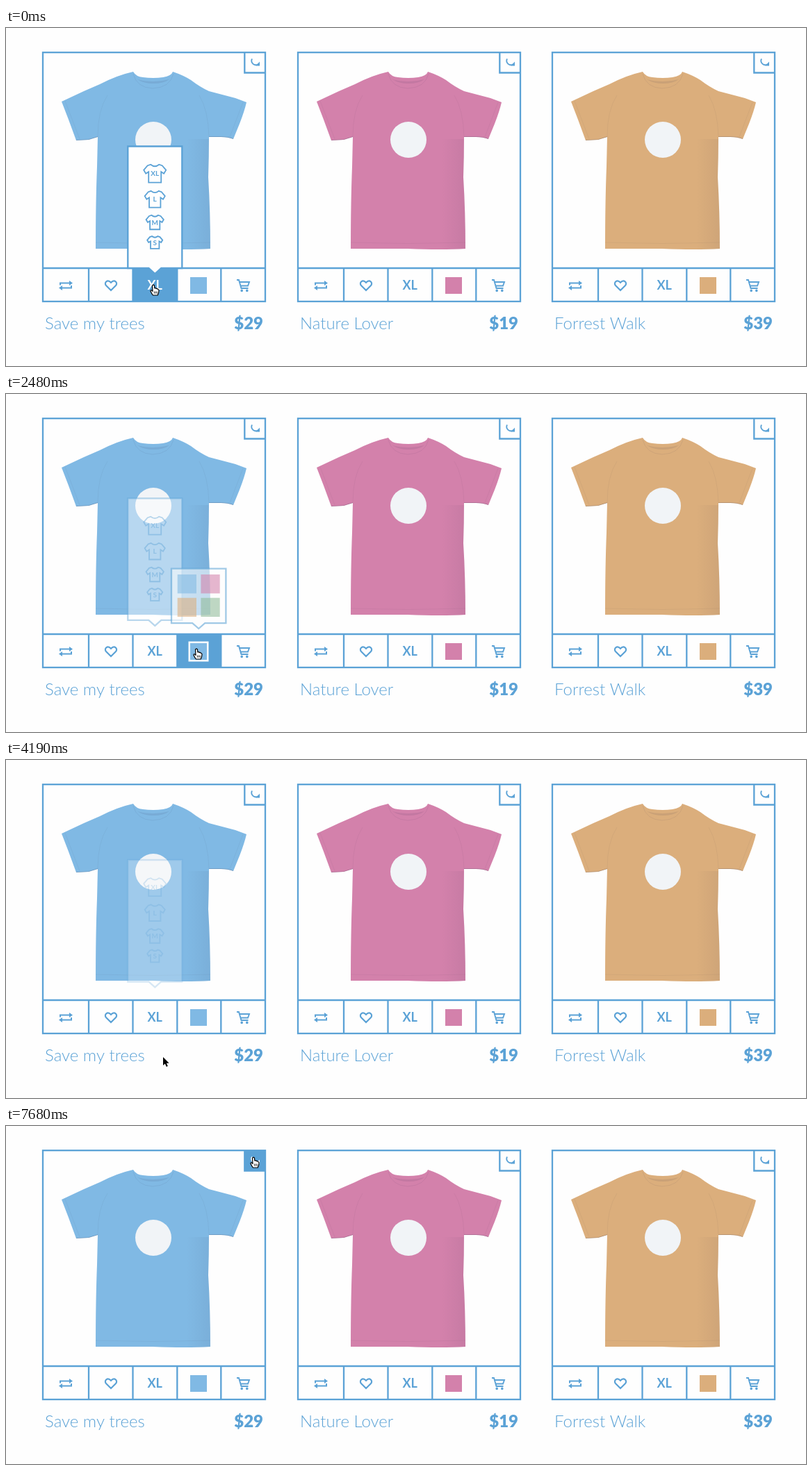
An HTML page with a canvas that plays this animation: 1151x487 px, repeating every 8 s.

```html
<!DOCTYPE html>
<html lang="en">
<head>
<meta charset="utf-8">
<title>Shirt shop</title>
<style>
  html, body { margin: 0; width: 100%; height: 100%; overflow: hidden; background: #fefefe; }
  canvas { display: block; width: 1151px; height: 487px; }
</style>
</head>
<body>
<canvas id="stage"></canvas>
<script>
const W = 1151, H = 487, LOOP = 8000;
const LINE = '#5ba2d6', PAPER = '#fefefe', PRINT = '#f1f4f7';
const BLUE = '#80b9e4', PINK = '#d381ab', TAN = '#dbae7c', GREEN = '#8fbb98';
const FONT = 'Lato, sans-serif';

const canvas = document.getElementById('stage');
const ctx = canvas.getContext('2d');
const ratio = window.devicePixelRatio || 1;
canvas.width = Math.round(W * ratio);
canvas.height = Math.round(H * ratio);

const cards = [
  { x: 0, title: 'Save my trees', price: '$29', color: BLUE },
  { x: 367, title: 'Nature Lover', price: '$19', color: PINK },
  { x: 733, title: 'Forrest Walk', price: '$39', color: TAN }
];
const edges = [53, 119, 182.5, 246.3, 309.3, 373];
const centers = [86, 151, 214.2, 277, 341];
const barTop = 346, barBottom = 394, barMid = 371;

// Periods of movement: start, end, number of picture updates
const bursts = [
  [420, 420, 1], [570, 920, 4], [1270, 1450, 4], [1600, 1830, 3], [2130, 2600, 6],
  [3050, 3270, 5], [3420, 3650, 3], [3860, 4040, 4], [4190, 4310, 2],
  [4480, 5050, 11], [5470, 5860, 7], [6100, 6670, 11], [7080, 7680, 11]
];

// Pointer tip: time, x, y
const pointerPath = [
  [0, 212, 370], [419, 212, 370], [420, 214, 370], [680, 274, 366], [1200, 274, 366],
  [1450, 236, 368], [1600, 230, 369], [1710, 227, 369], [1830, 226, 369], [2080, 226, 369],
  [2412, 274, 367], [2600, 277, 368], [3000, 277, 368], [3270, 236, 369], [3420, 230, 369],
  [3650, 225, 369], [3810, 225, 369], [4040, 226, 426], [4190, 226, 428], [4430, 226, 428],
  [5050, 85, 372], [5400, 85, 372], [5470, 86, 373], [5860, 150, 368], [6050, 150, 368],
  [6670, 233, 159], [7030, 233, 159], [7680, 356, 45], [8000, 356, 45]
];

// Menu changes: time, duration, open state reached
const sizeMenu = [[-500, 1, 1], [560, 300, 0], [1425, 350, 1], [2220, 350, 0], [3230, 380, 1], [3925, 390, 0]];
const colorMenu = [[-500, 1, 0], [560, 300, 1], [1415, 340, 0], [2220, 350, 1], [3240, 380, 0]];

const clamp = v => Math.max(0, Math.min(1, v));
const smooth = v => { v = clamp(v); return v * v * (3 - 2 * v); };

function snapTime(t) {
  let shown = 0;
  for (const [start, end, steps] of bursts) {
    if (t < start) break;
    const gap = (end - start) / (steps - 1) || 1;
    const step = Math.min(steps - 1, Math.floor((t - start) / gap + 0.1));
    shown = start + step * gap;
  }
  return shown;
}

function pointerAt(t) {
  let i = 0;
  while (i < pointerPath.length - 2 && pointerPath[i + 1][0] <= t) i++;
  const [t0, x0, y0] = pointerPath[i], [t1, x1, y1] = pointerPath[i + 1];
  const k = smooth((t - t0) / (t1 - t0));
  return { x: x0 + (x1 - x0) * k, y: y0 + (y1 - y0) * k };
}

function openness(changes, t) {
  let value = 0;
  for (const [start, length, goal] of changes) {
    if (t >= start) value += (goal - value) * smooth((t - start) / length);
  }
  return value;
}

function hoveredCell({ x, y }) {
  if (x > 343 && x < 373 && y > 35 && y < 65) return 'corner';
  if (y < barTop || y > barBottom) return -1;
  for (let i = 0; i < 5; i++) if (x >= edges[i] && x < edges[i + 1]) return i;
  return -1;
}

function at(x, y, scale, draw) {
  ctx.save();
  ctx.translate(x, y);
  ctx.scale(scale, scale);
  draw();
  ctx.restore();
}

function stroke(path, color, width) {
  ctx.strokeStyle = color;
  ctx.lineWidth = width;
  ctx.stroke(path);
}

function text(string, x, y, font, color, align = 'left') {
  ctx.font = `${font} ${FONT}`;
  ctx.fillStyle = color;
  ctx.textAlign = align;
  ctx.fillText(string, x, y);
}

function box(x, y, w, h, color) {
  ctx.fillStyle = color;
  ctx.fillRect(x, y, w, h);
}

const shirt = new Path2D(`M183 63 Q187 70 197 71 Q212 73 226 71 Q238 69 240 63 Q255 68 266 75
  Q279 85 292 91 L330 101 L346 107 Q343 120 336 138 L327 160 Q319 157 309 157 L292 157
  Q292 185 291 215 Q294 265 294 318 Q260 320 211 318 L129 318 Q129 250 131 200
  L132 157 L119 161 L101 162 L90 132 L80 106 L112 91 L135 81 Q160 68 183 63 Z`);
const collar = new Path2D('M183 66 Q188 86 211 87 Q236 86 241 66');
const innerCollar = new Path2D('M189 74 Q198 80 212 80 Q227 80 235 74 Q223 77 212 77 Q199 77 189 74 Z');
const seams = new Path2D('M129 309 Q211 312 294 309 M132 157 Q132 118 146 97 M292 157 Q291 118 278 97 M85 105 L106 160 M341 107 L322 157');
const cuffs = new Path2D('M101 162 L119 161 L132 157 M292 157 L309 157 Q319 157 327 160');

function drawShirt(color) {
  ctx.fillStyle = color;
  ctx.fill(shirt);
  ctx.save();
  ctx.clip(shirt);
  const shade = ctx.createLinearGradient(260, 0, 295, 0);
  shade.addColorStop(0, 'rgba(40,40,70,0)');
  shade.addColorStop(1, 'rgba(40,40,70,.07)');
  box(250, 160, 46, 160, shade);
  stroke(collar, 'rgba(40,40,70,.07)', 1);
  ctx.fillStyle = 'rgba(40,40,70,.09)';
  ctx.fill(innerCollar);
  stroke(seams, 'rgba(40,40,70,.05)', 1);
  stroke(cuffs, 'rgba(40,40,70,.25)', 1.6);
  ctx.restore();
  ctx.fillStyle = PRINT;
  ctx.beginPath();
  ctx.arc(212, 161, 26, 0, Math.PI * 2);
  ctx.fill();
}

const swapLines = new Path2D('M-8 -0.5 V-3.5 H6 M8 0 V3.5 H-6');
const swapHeads = new Path2D('M5 -7 L10 -3.5 L5 0 Z M-5 0 L-10 3.5 L-5 7 Z');
const heart = new Path2D('M0 7 L-7 0 C-10.5 -4 -5 -9.5 0 -4.2 C5 -9.5 10.5 -4 7 0 Z');
const cart = new Path2D('M-9 -8 H-6 L-2.5 4 H7.5 M-5 -5 H9 L7 0.5 H-3.5');
const wheels = new Path2D('M-3.6 7.4 a1.8 1.8 0 1 0 3.6 0 a1.8 1.8 0 1 0 -3.6 0 M4 7.4 a1.8 1.8 0 1 0 3.6 0 a1.8 1.8 0 1 0 -3.6 0');
const turnArc = new Path2D('M-4 -4.6 A6 6 0 0 0 4.6 3.2');
const turnHead = new Path2D('M7 -0.5 V5.5 H1.2 Z');

function drawIcon(cell, color, swatch) {
  if (cell === 0) {
    stroke(swapLines, color, 2);
    ctx.fillStyle = color;
    ctx.fill(swapHeads);
  } else if (cell === 1) {
    stroke(heart, color, 2.2);
  } else if (cell === 2) {
    text('XL', 0, 6.2, '700 18px', color, 'center');
  } else if (cell === 3) {
    if (color === PAPER) box(-14.5, -14.5, 29, 29, PAPER);
    box(-12, -12, 24, 24, swatch);
  } else {
    stroke(cart, color, 1.9);
    ctx.fillStyle = color;
    ctx.fill(wheels);
  }
}

function drawCard(card, hover) {
  drawShirt(card.color);
  const corner = hover === 'corner';
  if (corner) box(343, 35, 30, 30, LINE);
  if (hover >= 0) box(edges[hover], barTop, edges[hover + 1] - edges[hover], barBottom - barTop, LINE);

  ctx.strokeStyle = LINE;
  ctx.lineWidth = 2.3;
  ctx.strokeRect(53, 35.2, 320, 358.8);
  ctx.beginPath();
  ctx.moveTo(53, barTop);
  ctx.lineTo(373, barTop);
  for (const x of edges.slice(1, 5)) {
    ctx.moveTo(x, barTop);
    ctx.lineTo(x, barBottom);
  }
  ctx.moveTo(343.3, 35);
  ctx.lineTo(343.3, 64.5);
  ctx.lineTo(373, 64.5);
  ctx.stroke();

  at(358, 49, 1, () => {
    const color = corner ? PAPER : LINE;
    stroke(turnArc, color, 1.9);
    ctx.fillStyle = color;
    ctx.fill(turnHead);
  });
  centers.forEach((x, i) => at(x, barMid, 1, () => drawIcon(i, i === hover ? PAPER : LINE, card.color)));
  text(card.title, 56, 434, '300 24px', LINE);
  text(card.price, 370, 434, '900 24px', LINE, 'right');
}

function drawMenu(mid, half, top, bottom, open, content) {
  if (open <= 0.002) return;
  ctx.save();
  ctx.globalAlpha = open;
  ctx.translate(0, -35 * (1 - open));
  const frame = new Path2D(`M${mid - half} ${top} H${mid + half} V${bottom} H${mid + 9}
    L${mid} ${bottom + 8} L${mid - 9} ${bottom} H${mid - half} Z`);
  ctx.fillStyle = PAPER;
  ctx.fill(frame);
  stroke(frame, LINE, 2.3);
  content();
  ctx.restore();
}

const miniShirt = new Path2D('M-6 -13 Q0 -8 6 -13 L10.5 -11.5 L16 -5 L13 0 L9 -2.5 V13 H-9 V-2.5 L-13 0 L-16 -5 L-10.5 -11.5 Z');
const sizes = [['XL', 209.7, 1], ['L', 246.7, 0.91], ['M', 280, 0.79], ['S', 309, 0.69]];

function sizeContent() {
  for (const [label, y, scale] of sizes) {
    at(214.2, y, scale, () => stroke(miniShirt, LINE, 1.8 / scale));
    text(label, 214.2, y + 3.6, '700 10px', LINE, 'center');
  }
}

function colorContent() {
  [BLUE, PINK, TAN, GREEN].forEach((color, i) =>
    box(246.7 + (i % 2) * 33.7, 275 + (i >> 1) * 33.7, 27.3, 27.3, color));
}

const hand = new Path2D(`M-1.5 1.2 Q0 -1 1.5 1.2 L1.8 5 Q3.5 4.2 4.2 5.6 Q6 5 6.4 6.6
  Q8 6.4 8 8 L7.6 11 L6.2 15 H-0.6 Q-2.5 12.5 -4 9.2 Q-4.2 7.4 -2.6 7.8 L-1 9.4 Z`);
const fingers = new Path2D('M1.4 9.5 V12.6 M3.3 9.5 V12.6 M5.2 9.5 V12.6');
const arrow = new Path2D('M0 0 V12 L2.8 9.5 L4.8 14 L6.8 13.1 L4.9 8.8 H8.6 Z');

function drawPointer(pos, overCell) {
  at(pos.x, pos.y, 1, () => {
    ctx.lineJoin = 'round';
    if (overCell) {
      ctx.fillStyle = '#fff';
      ctx.fill(hand);
      stroke(hand, '#000', 1.2);
      stroke(fingers, '#000', 0.8);
    } else {
      stroke(arrow, '#fff', 1.8);
      ctx.fillStyle = '#000';
      ctx.fill(arrow);
    }
  });
}

function render(now) {
  const t = snapTime(now % LOOP);
  const pos = pointerAt(t);
  const hover = hoveredCell(pos);
  ctx.setTransform(ratio, 0, 0, ratio, 0, 0);
  box(0, 0, W, H, PAPER);
  cards.forEach((card, i) => at(card.x, 0, 1, () => drawCard(card, i ? -1 : hover)));
  drawMenu(214.3, 39, 170.5, 346, openness(sizeMenu, t), sizeContent);
  drawMenu(277.2, 39.2, 266.5, 345, openness(colorMenu, t), colorContent);
  drawPointer(pos, hover !== -1);
}

const began = performance.now();
function tick() {
  render(performance.now() - began);
  requestAnimationFrame(tick);
}
tick();
</script>
</body>
</html>
```
